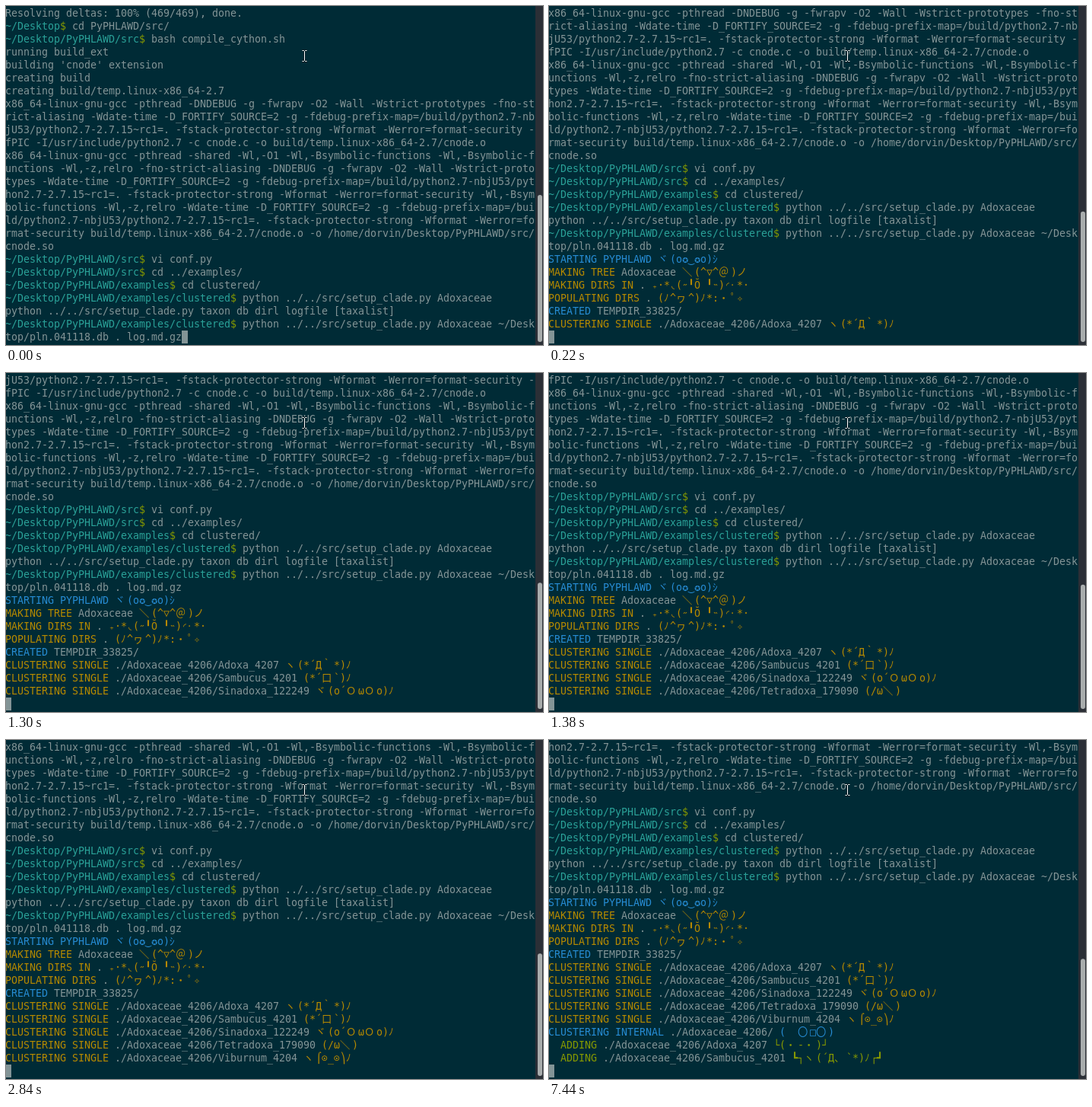
Animation of 706 by 445 pixels, one loop 8 s. Source, as an HTML page with a canvas:

```html
<!DOCTYPE html>
<html lang="en">
<head>
<meta charset="utf-8">
<title>Terminal session</title>
<style>
html, body { margin: 0; width: 100%; height: 100%; overflow: hidden; background: #002b36; }
canvas { display: block; }
</style>
</head>
<body>
<canvas id="screen" width="706" height="445"></canvas>
<script>
const LOOP = 8000, COLS = 87, ROWS = 26, CELL = 8, LINE = 17, LEFT = -1, TOP = 1;
const BG = '#002b36', FG = '#839496', CYAN = '#2aa198', GREEN = '#859900',
      YELLOW = '#b58900', BLUE = '#268bd2';
const ctx = document.getElementById('screen').getContext('2d');

const plain = text => [[FG, text]];
const prompt = (dir, command) => [[CYAN, '~/Desktop' + dir], [GREEN, '$'], [FG, ' ' + command]];
const status = (color, label, text, face = '') => [[color, label], [FG, ` ${text} `], [color, face]];
const single = (taxon, face) => status(YELLOW, 'CLUSTERING SINGLE', './Adoxaceae_4206/' + taxon, face);
const adding = (taxon, face) => status(GREEN, '  ADDING', './Adoxaceae_4206/' + taxon, face);

const SRC = '/PyPHLAWD/src', EXAMPLES = '/PyPHLAWD/examples', CLUSTERED = EXAMPLES + '/clustered';
const GCC = 'x86_64-linux-gnu-gcc -pthread ';
const WARN = '-DNDEBUG -g -fwrapv -O2 -Wall -Wstrict-prototypes ';
const HARDEN = '-Wdate-time -D_FORTIFY_SOURCE=2 -g -fdebug-prefix-map=/build/python2.7-nbjU53/' +
  'python2.7-2.7.15~rc1=. -fstack-protector-strong -Wformat -Werror=format-security ';
const BUILD = 'build/temp.linux-x86_64-2.7';
const SYMBOLIC = '-Wl,-Bsymbolic-functions ', RELRO = '-Wl,-z,relro ', ALIAS = '-fno-strict-aliasing ';
const SETUP = 'python ../../src/setup_clade.py ';

const session = [
  plain('Resolving deltas: 100% (469/469), done.'),
  prompt('', 'cd PyPHLAWD/src/'),
  prompt(SRC, 'bash compile_cython.sh'),
  plain('running build_ext'),
  plain("building 'cnode' extension"),
  plain('creating build'),
  plain('creating ' + BUILD),
  plain(GCC + WARN + ALIAS + HARDEN +
    `-fPIC -I/usr/include/python2.7 -c cnode.c -o ${BUILD}/cnode.o`),
  plain(GCC + '-shared -Wl,-O1 ' + SYMBOLIC + SYMBOLIC + RELRO + ALIAS + WARN + HARDEN +
    SYMBOLIC + RELRO + HARDEN + `${BUILD}/cnode.o -o /home/dorvin/Desktop${SRC}/cnode.so`),
  prompt(SRC, 'vi conf.py'),
  prompt(SRC, 'cd ../examples/'),
  prompt(EXAMPLES, 'cd clustered/'),
  prompt(CLUSTERED, SETUP + 'Adoxaceae'),
  plain(SETUP + 'taxon db dirl logfile [taxalist]'),
  prompt(CLUSTERED, SETUP + 'Adoxaceae ~/Desktop/pln.041118.db . log.md.gz'),
  [[BLUE, 'STARTING PYPHLAWD ヾ(o✪‿✪o)ｼ']],
  status(YELLOW, 'MAKING TREE', 'Adoxaceae', '＼(^▽^＠)ノ'),
  status(YELLOW, 'MAKING DIRS IN', '.', '₊·*◟(˶╹Ŏ ╹˵)◜‧*·'),
  status(YELLOW, 'POPULATING DIRS', '.', '(ﾉ^ヮ^)ﾉ*:・ﾟ✧'),
  status(BLUE, 'CREATED', 'TEMPDIR_33825/'),
  single('Adoxa_4207', 'ヽ(*´Д｀*)ﾉ'),
  single('Sambucus_4201', '(*´口`)ﾉ'),
  single('Sinadoxa_122249', 'ヾ(o´ＯωＯo)ﾉ'),
  single('Tetradoxa_179090', '(/ω＼)'),
  single('Viburnum_4204', 'ヽ⌠⊙_⊙⎞ﾉ'),
  status(BLUE, 'CLUSTERING INTERNAL', './Adoxaceae_4206/', '(  〇□〇)'),
  adding('Adoxa_4207', '└(・-・)┘'),
  adding('Sambucus_4201', '┗┐ヽ(´Д、`*)ﾉ┌┛'),
];

// Time in ms and number of rows scrolled from then on
const scrolls = [[0, 0], [180, 5], [220, 7], [340, 8], [1300, 9], [1380, 10], [1420, 11], [7400, 13], [7440, 14]];

// Lay the session out on a character grid
const isWide = ch => /[\u3000-\u30ff\u53e3\uff01-\uff60]/.test(ch);
const rows = [];
for (const line of session) {
  let row = [], col = 0;
  rows.push(row);
  for (const [color, text] of line) {
    for (const ch of text) {
      if (col >= COLS) {
        rows.push(row = []);
        col = 0;
      }
      if (ch !== ' ') row.push({ ch, col, color });
      col += isWide(ch) ? 2 : 1;
    }
  }
}

function drawScrollbar(scrolled) {
  const top = 441 - 193 * 55 / (55 + scrolled);
  ctx.fillStyle = '#2b2f36';
  ctx.fillRect(696, 0, 10, 445);
  ctx.fillStyle = '#a9adad';
  ctx.beginPath();
  ctx.roundRect(699, top, 6, 441 - top, 3);
  ctx.fill();
}

function drawPointer() {
  const beam = new Path2D('M389.5 58.5h2l1 1 1-1h2M392.5 59.5v12M389.5 72.5h2l1-1 1 1h2');
  for (const [color, width] of [['#001a20', 2.5], ['#fff', 1]]) {
    ctx.strokeStyle = color;
    ctx.lineWidth = width;
    ctx.stroke(beam);
  }
}

function draw(scrolled) {
  ctx.fillStyle = BG;
  ctx.fillRect(0, 0, 706, 445);
  ctx.font = '13.333px "DejaVu Sans Mono", "DejaVu Sans", "Noto Sans Mono", "Noto Sans CJK JP", monospace';
  const visible = scrolled ? ROWS - 1 : ROWS;
  rows.slice(scrolled, scrolled + visible).forEach((row, r) => {
    for (const { ch, col, color } of row) {
      ctx.fillStyle = color;
      ctx.fillText(ch, LEFT + col * CELL, TOP + r * LINE + 13);
    }
  });
  ctx.fillStyle = FG;
  ctx.fillRect(LEFT + (scrolled ? 0 : 29) * CELL, TOP + (ROWS - 1) * LINE, CELL, LINE);
  drawScrollbar(scrolled);
  drawPointer();
}

const start = performance.now();
let shown = -1;
function tick() {
  const t = (performance.now() - start) % LOOP;
  const scrolled = scrolls.findLast(([time]) => time <= t)[1];
  if (scrolled !== shown) draw(shown = scrolled);
  requestAnimationFrame(tick);
}
tick();
</script>
</body>
</html>
```
